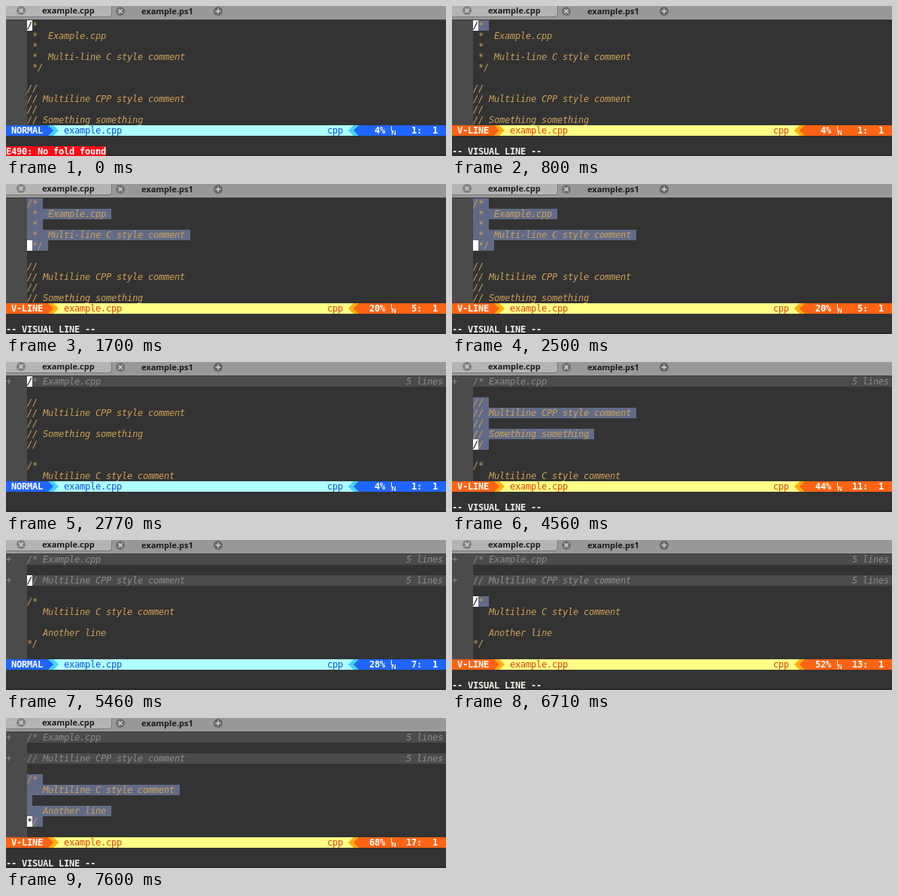
Write an HTML page with a canvas that moves like this. It is 585 by 200 pixels and loops after 8000 ms.

```html
<!DOCTYPE html>
<html lang="en">
<head>
<meta charset="utf-8">
<title>Folding comments</title>
<style>
html, body { margin: 0; width: 585px; height: 200px; overflow: hidden; background: #333; }
canvas { display: block; }
</style>
</head>
<body>
<canvas id="stage" width="585" height="200"></canvas>
<script>
const ctx = document.getElementById('stage').getContext('2d');
const LOOP = 8000, W = 585, CW = 7, CH = 14, TOP = 19, GUTTER = 4;
const MONO = '12px "DejaVu Sans Mono", monospace';
const BG = '#333333', FOLD_BG = '#4b4b4b', FOLD_FG = '#8c8c8c';
const COMMENT = '#cda057', SELECT = '#616b87';

const lines = [
  '/*', ' *  Example.cpp', ' *', ' *  Multi-line C style comment', ' */', '',
  '//', '// Multiline CPP style comment', '//', '// Something something', '//', '',
  '/*', '   Multiline C style comment', '', '   Another line', '*/', ''
];
const TOTAL = 25;

const folds = [
  { at: 2770, from: 1, to: 5, text: '/* Example.cpp' },
  { at: 5460, from: 7, to: 11, text: '// Multiline CPP style comment' }
];
// [time, cursor line]
const moves = [
  [0, 1], [1250, 2], [1430, 3], [1520, 4], [1700, 5], [2770, 1], [3220, 6], [3300, 7],
  [4110, 8], [4290, 9], [4470, 10], [4560, 11], [5460, 7], [6000, 12], [6080, 13],
  [7160, 14], [7250, 15], [7420, 16], [7600, 17]
];
// [start, end, first selected line]
const visuals = [[800, 2770, 1], [3930, 5460, 7], [6710, LOOP, 13]];
const cursorOff = [[260, 530], [2420, 2500]];

const themes = {
  normal: { label: 'NORMAL', strong: '#2065ff', mid: '#45d2fa', pale: '#afffff', ink: '#0a4fe0' },
  visual: { label: 'V-LINE', strong: '#ff6314', mid: '#ffaf0f', pale: '#ffff87', ink: '#dc3f0c' }
};

const during = t => ([start, end]) => t >= start && t < end;
const rowY = row => TOP + row * CH;

function rect(x, y, w, h, color) {
  ctx.fillStyle = color;
  ctx.fillRect(x, y, w, h);
}

function cells(col, row, n, color) {
  rect(col * CW, rowY(row), n * CW, CH, color);
}

// One glyph per terminal cell
function write(text, col, row, color, style = '') {
  ctx.font = style + ' ' + MONO;
  ctx.fillStyle = color;
  [...text].forEach((ch, i) => ctx.fillText(ch, (col + i) * CW, rowY(row) + 11));
}

function stroke(path, color, width = 1) {
  ctx.strokeStyle = color;
  ctx.lineWidth = width;
  ctx.stroke(new Path2D(path));
}

function arrow(col, dir, color, back) {
  cells(col, 10, 1, back);
  const base = (dir > 0 ? col : col + 1) * CW, y = rowY(10);
  ctx.fillStyle = color;
  ctx.fill(new Path2D(`M${base} ${y}l${dir * CW} ${CH / 2}l${-dir * CW} ${CH / 2}z`));
}

function button(x, y, sign, fill) {
  ctx.fillStyle = fill;
  ctx.beginPath();
  ctx.arc(x, y, 6, 0, 7);
  ctx.fill();
  stroke(`M${x} ${y}` + sign, '#d2d2d2', 1.6);
}

function drawTabs() {
  rect(0, 0, W, TOP, '#989898');
  ctx.fillStyle = '#b4b4b4';
  ctx.fill(new Path2D('M0 0H140V10Q140 14 136 14H0z'));
  stroke('M140.5 0V10Q140.5 14.5 136 14.5H0', '#777777');
  rect(0, 15, W, 3, '#999999');
  rect(0, 18, W, 1, '#3c3c3c');
  const cross = 'm-2.5 -2.5l5 5m0 -5l-5 5';
  button(20, 6, cross, '#828282');
  button(152, 7, cross, '#707070');
  button(282, 7, 'm-3.5 0h7m-3.5 -3.5v7', '#666666');
  ctx.font = 'bold 11px "Open Sans", sans-serif';
  ctx.fillStyle = '#1c1c1c';
  ctx.fillText('example.cpp', 48, 10);
  ctx.fillText('example.ps1', 180, 11);
}

function drawStatus(theme, line) {
  const y = rowY(10);
  rect(0, y, W, CH, theme.pale);
  cells(0, 10, 8, theme.strong);
  rect(67 * CW, y, W - 67 * CW, CH, theme.strong);
  arrow(8, 1, theme.strong, theme.mid);
  arrow(9, 1, theme.mid, theme.pale);
  arrow(65, -1, theme.mid, theme.pale);
  arrow(66, -1, theme.strong, theme.mid);
  write(theme.label, 1, 10, '#fff', 'bold');
  write('example.cpp', 11, 10, theme.ink);
  write('cpp', 61, 10, theme.ink);
  const percent = Math.floor(line * 100 / TOTAL) + '%';
  write(percent.padStart(4), 68, 10, '#fff', 'bold');
  write(String(line).padStart(3) + ':', 75, 10, '#fff', 'bold');
  write(lines[line - 1] ? '1' : '0', 81, 10, '#fff', 'bold');
  // Line-number symbol
  stroke('M512.5 160v6.5h3M513.5 172v-6l4 6v-6', '#fff');
}

function draw(t) {
  const line = moves.findLast(m => t >= m[0])[1];
  const visual = visuals.find(during(t));
  const showCursor = !cursorOff.some(during(t));

  rect(0, 0, W, 200, BG);
  rect(0, 198, W, 2, '#2c272b');
  drawTabs();
  rect(0, TOP, GUTTER * CW, 10 * CH, FOLD_BG);

  for (let row = 0, n = 1; row < 10; row++, n++) {
    const first = n;
    const fold = folds.find(f => f.from === n && t >= f.at);
    const text = fold ? fold.text : lines[n - 1];
    if (fold) {
      rect(0, rowY(row), W, CH, FOLD_BG);
      write('+', 0, row, FOLD_FG);
      write('5 lines', 76, row, FOLD_FG, 'italic');
      n = fold.to;
    } else if (visual && n >= visual[2] && n <= line) {
      cells(GUTTER, row, text.length + 1, SELECT);
    }
    write(text, GUTTER, row, fold ? FOLD_FG : COMMENT, 'italic');
    if (first === line && showCursor) {
      cells(GUTTER, row, 1, '#fff');
      write(text.slice(0, 1), GUTTER, row, '#000', 'italic');
    }
  }

  drawStatus(visual ? themes.visual : themes.normal, line);

  if (visual) {
    write('-- VISUAL LINE --', 0, 12, '#f0f0ea', 'bold');
  } else if (t < 800) {
    cells(0, 12, 19, '#ff0a14');
    write('E490: No fold found', 0, 12, '#fff', 'bold');
  }
}

const start = performance.now();
function tick() {
  draw((performance.now() - start) % LOOP);
  requestAnimationFrame(tick);
}
tick();
</script>
</body>
</html>
```
